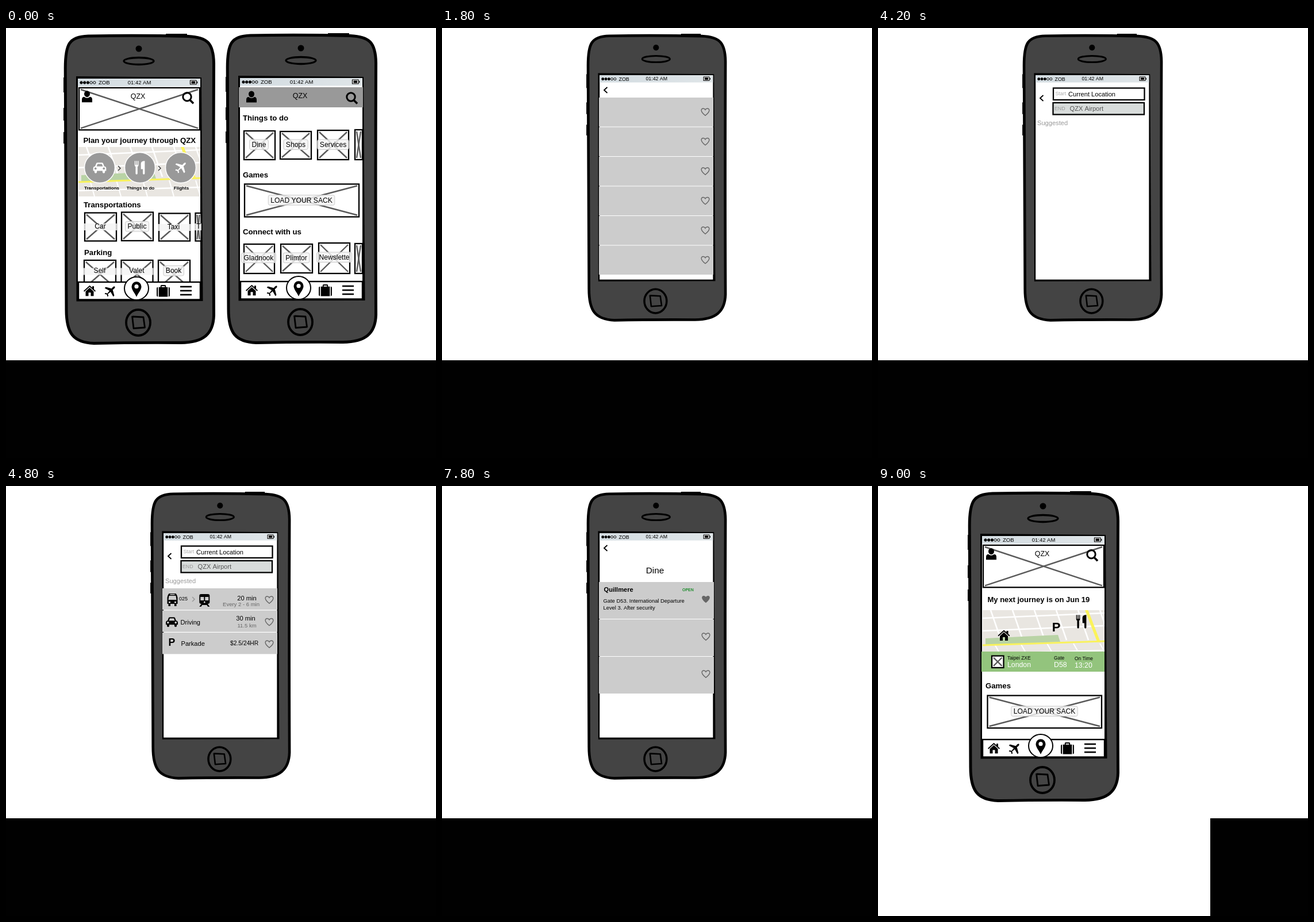
An HTML page with a canvas for the animation above (9600 ms loop, 748 px wide and 748 px high).

```html
<!DOCTYPE html>
<html lang="en">
<head>
<meta charset="utf-8">
<title>Airport app wireframe</title>
<style>
html, body { margin: 0; width: 100%; height: 100%; overflow: hidden; background: #fff; }
canvas { display: block; width: 748px; height: 748px; }
</style>
</head>
<body>
<canvas id="stage" width="748" height="748"></canvas>
<script>
const c = document.getElementById('stage').getContext('2d');
const STEP = 600, LINK = '#1c5088', GREY = '#999', DARK = '#666', ROW = '#ccc';
const PORT = 'QZX', GAME = 'LOAD YOUR SACK', DINER = 'Quillmere';

const ICON = {
  house: 'M-7 1L0-5.5 7 1V9H2V3H-2V9H-7ZM-10.5 0L0-9.5 4.5-5.5V-8H7.5V-2.7L10.5 0 9.3 1.4 0-7-9.3 1.4Z',
  plane: 'M9-9C7-10 5-8 3-5L-8-8-10-6-1-1-5 4-9 3-10 5-6 6-5 10-3 9-4 5 1 1 6 10 8 8 5-3C8-5 10-7 9-9Z',
  car: 'M-10.5 1Q-10-2-7.5-2L-5.5-7Q-5-8-3.5-8H3.5Q5-8 5.5-7L7.5-2Q10-2 10.5 1V5H8.5V7Q8.5 9 6.5 9T4.5 7V5H-4.5V7Q-4.5 9-6.5 9T-8.5 7V5H-10.5ZM-5-2H5L3.5-6H-3.5ZM-8.5 1.3a1.8 1.8 0 1 0 3.6 0a1.8 1.8 0 1 0-3.6 0M4.9 1.3a1.8 1.8 0 1 0 3.6 0a1.8 1.8 0 1 0-3.6 0',
  bus: 'M-6-11H6Q8-9 9-4V7H7V11H3.5V7H-3.5V11H-7V7H-9V-4Q-8-9-6-11ZM-6-7L-7 0H7L6-7ZM-6.5 3h3v2.5h-3zM3.5 3h3v2.5h-3zM-4-10h8v1.5h-8z',
  train: 'M-6-11H6Q9-11 9-8V3Q9 6 5.5 6L9 11H6L4 8H-4L-6 11H-9L-5.5 6Q-9 6-9 3V-8Q-9-11-6-11ZM-7-6V0H-1V-6ZM1-6V0H7V-6ZM-1.5 3a1.5 1.5 0 1 0 3 0a1.5 1.5 0 1 0-3 0',
  food: 'M-11-14H-9.4V-6H-7.8V-14H-6.2V-6H-4.6V-14H-3V-5Q-3-3-5-2V12Q-5 14-7 14T-9 12V-2Q-11-3-11-5ZM10-14V12Q10 14 8 14T6 12V3H2V-8Q2-14 10-14Z',
  shop: 'M-13-13H13L14-9.5H-14ZM-14-8.5H14L10.5 6.5H-10.5Z',
  case: 'M-12-7H-6V-9Q-6-12-3-12H3Q6-12 6-9V-7H12Q14-7 14-5V3H3V1H-3V3H-14V-5Q-14-7-12-7ZM-4-7H4V-9Q4-10 3-10H-3Q-4-10-4-9ZM-14 4.5H-3V6H3V4.5H14V10Q14 12 12 12H-12Q-14 12-14 10Z',
  bag: 'M-11-4Q-11-6-9-6V10Q-11 10-11 8ZM-7.5-6H-4.5V-8Q-4.5-9.5-3-9.5H3Q4.5-9.5 4.5-8V-6H7.5V10H-7.5ZM-2.7-6H2.7V-7.7H-2.7ZM9-6Q11-6 11-4V8Q11 10 9 10Z',
  pin: 'M0 13C-3 6-8.5 1-8.5-5A8.5 8.5 0 0 1 8.5-5C8.5 1 3 6 0 13ZM-3.6-5a3.6 3.6 0 1 0 7.2 0a3.6 3.6 0 1 0-7.2 0',
  user: 'M-5-5a5 5.5 0 1 0 10 0a5 5.5 0 1 0-10 0M-9 9.5V5Q-9 0-5 0Q0 4 5 0Q9 0 9 5V9.5Z',
  heart: 'M0 6.3C-9.5-1-7.5-6-3.7-6C-1.7-6-.5-5 0-3.8C.5-5 1.7-6 3.7-6C7.5-6 9.5-1 0 6.3Z'
};
for (const k in ICON) ICON[k] = new Path2D(ICON[k]);

function at(x, y, s, draw) {
  c.save(); c.translate(x, y); c.scale(s, s); draw(); c.restore();
}
function icon(name, x, y, s = 1, color = '#000') {
  at(x, y, s, () => { c.fillStyle = color; c.fill(ICON[name], 'evenodd'); });
}
function heart(x, y, full) {
  if (full) return icon('heart', x, y, 1, DARK);
  at(x, y, 1, () => { c.strokeStyle = DARK; c.lineWidth = 1.4; c.stroke(ICON.heart); });
}
function text(s, x, y, size, color = '#000', align = 'left', weight = 'normal') {
  c.font = `${weight} ${size}px "Liberation Sans", Arial, sans-serif`;
  c.fillStyle = color; c.textAlign = align; c.textBaseline = 'alphabetic';
  c.fillText(s, x, y + size * 0.32);
}
const mid = (s, x, y, size, color, weight) => text(s, x, y, size, color, 'center', weight);
const bold = (s, x, y, size = 13.2) => text(s, x, y, size, '#000', 'left', 'bold');
function rect(x0, y0, x1, y1, fill, stroke, w = 2) {
  if (fill) { c.fillStyle = fill; c.fillRect(x0, y0, x1 - x0, y1 - y0); }
  if (stroke) { c.strokeStyle = stroke; c.lineWidth = w; c.strokeRect(x0, y0, x1 - x0, y1 - y0); }
}
function line(color, w, ...p) {
  c.strokeStyle = color; c.lineWidth = w; c.beginPath();
  for (let i = 0; i < p.length; i += 2) c.lineTo(p[i], p[i + 1]);
  c.stroke();
}
function oval(x, y, rx, ry, fill, stroke, w = 2) {
  c.beginPath(); c.ellipse(x, y, rx, ry, 0, 0, 7);
  if (fill) { c.fillStyle = fill; c.fill(); }
  if (stroke) { c.strokeStyle = stroke; c.lineWidth = w; c.stroke(); }
}

// Device, drawn at its large size with the top left corner at 0,0.
function phone() {
  for (const [y, h] of [[76, 26], [129, 22], [171, 20]]) line('#000', 4, 1, y, 1, y + h);
  line('#000', 4, 177, 2, 214, 2);
  c.fillStyle = '#444'; c.strokeStyle = '#000'; c.lineWidth = 5; c.lineJoin = 'round';
  const body = new Path2D('M2.2 60C2.2 18 8.5 5 42 4Q130 2.5 216 4.5C249 6 260 16 260.5 52Q259.5 280 260.5 490C259.5 522 243 537 203 537.5Q120 537 52 538.5C15 537 4 520 4 480Q2.7 270 2.2 60Z');
  c.fill(body); c.stroke(body);
  oval(130, 26, 5.5, 5.5, '#000');
  oval(130, 47.5, 26, 6, null, '#000', 3.3);
  oval(129, 502.5, 21, 22.5, null, '#000', 3.8);
  line('#000', 2.8, 119, 492, 138, 493, 140.5, 511, 121, 512.5, 118.5, 491);
  c.fillStyle = '#000'; c.beginPath();
  for (const [x, y] of [[21, 74], [239, 76], [241.5, 465], [21.5, 465.5]]) c.lineTo(x, y);
  c.fill();
  rect(24, 78, 237, 462, '#fff');
  const g = c.createLinearGradient(24, 0, 237, 0);
  g.addColorStop(0, '#d3dce1'); g.addColorStop(1, '#dfe5e8');
  rect(24, 78, 237, 91.5, g);
  for (let i = 0; i < 5; i++) oval(30 + i * 5.7, 85, 2.2, 2.2, i < 3 ? '#000' : null, '#000', 1);
  text('ZOB', 60, 85, 9.6);
  mid('01:42 AM', 131, 85, 9.5);
  rect(219.5, 81, 230, 88, '#fff', '#000', 1.2);
  rect(221.5, 82.5, 228, 86.7, '#000');
  rect(231, 83, 232.3, 86.3, '#000');
}

function crossBox(x0, y0, x1, y1, label, round, lx = (x0 + x1) / 2, ly = (y0 + y1) / 2) {
  rect(x0, y0, x1, y1, '#fff', '#000', 2.3);
  line('#5a5a5a', 2.4, x0 + 3, y0 + 3, x1 - 3, y1 - 3);
  line('#5a5a5a', 2.4, x0 + 3, y1 - 3, x1 - 3, y0 + 3);
  if (!label) return;
  c.font = '12.1px "Liberation Sans", Arial, sans-serif';
  const w = c.measureText(label).width / 2 + 4;
  c.fillStyle = 'rgba(245,245,245,.82)';
  if (round) {
    c.beginPath(); c.roundRect(lx - w, ly - 9, 2 * w, 17.5, 3); c.fill();
    c.strokeStyle = '#ccc'; c.lineWidth = 1; c.stroke();
  } else c.fillRect(x0 - 2, ly - 5, x1 - x0 + 3, 12);
  mid(label, lx, ly, 12.1);
}

// Street map strip; the origin is its top left corner.
function map(x, y, h) {
  at(x, y, 1, () => {
    c.beginPath(); c.rect(0, 0, 212, h); c.clip();
    rect(0, 0, 212, h, '#e9e6e1');
    for (const [a, b] of [[14, 5], [36, 27], [76, 70]]) line('#fff', 2.6, 0, a, 212, b);
    for (let i = 0; i < 6; i++) line('#fff', 2.5, 14 + i * 38, 0, 32 + i * 38, 52);
    for (let i = 0; i < 5; i++) line('#fff', 2, 20 + i * 46, 58, 28 + i * 46, h);
    c.fillStyle = '#b9d3a5'; c.beginPath();
    for (const [a, b] of [[5, 49], [131, 43], [135, 55], [5, 61]]) c.lineTo(a, b);
    c.fill();
    line('#f9f25c', 3, 0, 61, 212, 54);
    line('#fbf35a', 5, 180, -2, 202, 55);
  });
}

function chevron(x, y, w, h, color, lw) { line(color, lw, x - w, y - h, x + w, y, x - w, y + h); }
function tools(ux, sx, y) {
  icon('user', ux, y);
  oval(sx, y, 7.2, 7.2, null, '#000', 3);
  line('#000', 3.6, sx + 5, y + 5.5, sx + 11, y + 11.5);
  mid(PORT, 229.5, 119.4, 12.4);
}
function nav() {
  rect(126, 442, 338, 472.5, '#fff', '#000', 2.4);
  oval(227, 453, 21, 20, '#fff', '#000', 2);
  icon('pin', 227, 454.7);
  icon('house', 145.5, 457.3);
  icon('plane', 181, 458, .93);
  icon('bag', 273.5, 457, 1.04);
  for (const y of [450, 457, 464]) line('#000', 2.6, 303, y, 323, y);
}
// Large device; the frame and inside are laid out for a screen at 125,88.
function large(dx, dy, inside) {
  at(dx, dy, 1, () => {
    at(101, 10, 1, phone);
    c.beginPath(); c.rect(123, 86, 217, 388); c.clip();
    inside(); nav();
  });
}
function banner() { crossBox(127, 104, 337, 177.3); tools(141, 315, 119.7); }

function home() {
  large(0, 0, () => {
    banner();
    bold(`Plan your journey through ${PORT}`, 134.5, 195.4);
    map(126, 207, 86);
    const stops = [['car', 'Transportations', 163, 1.08], ['food', 'Things to do', 233, .84], ['plane', 'Flights', 304, .95]];
    for (const [ic, label, x, s] of stops) {
      oval(x, 243, 26.5, 26.5, GREY, '#fff', 1.5);
      icon(ic, x, 243, s, '#fff');
      mid(label, x < 200 ? 166.5 : x + 1, 278.5, 8.1, '#000', 'bold');
    }
    chevron(197, 244, 2, 4, '#333', 1.4);
    chevron(267, 244, 2, 4, '#333', 1.4);
    bold('Transportations', 135, 307.5);
    crossBox(137, 321.5, 192, 370.5, 'Car', 0, 164, 345);
    crossBox(201, 320.5, 256, 370, 'Public', 1, 228, 345.5);
    crossBox(266, 322.5, 320, 370.5, 'Taxi', 0, 291.5, 346);
    crossBox(329.5, 322, 339.5, 370.5, 'T', 0, 335, 345);
    bold('Parking', 136, 391);
    ['Self', 'Valet', 'Book'].forEach((s, i) =>
      crossBox(136 + i * 64.5, 404, 191 + i * 64.5, 453, s, i == 2, 163 + i * 64.3, 422.5));
  });
  large(282, -1, () => at(-282, 1, 1, () => {
    rect(405, 103, 621, 138, GREY);
    at(282, -1, 1, () => tools(145, 318, 121));
    bold('Things to do', 412, 157);
    crossBox(414, 179, 468, 229, 'Dine', 1, 440, 203);
    crossBox(477, 180, 531, 228, 'Shops', 1, 504, 203);
    crossBox(542, 178, 596, 229, 'Services', 1, 569, 203);
    crossBox(607, 177, 620, 229);
    bold('Games', 412, 255.7);
    crossBox(415, 271.5, 614, 328.5, GAME, 1, 514, 299.7);
    bold('Connect with us', 412, 355);
    crossBox(414, 376, 467, 427, 'Gladnook', 1, 439.5, 400);
    crossBox(478, 376, 533, 426, 'Plimtor', 1, 505, 400);
    crossBox(544, 374, 598, 427, 'Newslette', 1, 571, 399);
    crossBox(607, 375, 620, 427);
  }));
}

function done() {
  large(56, -1, () => at(-56, 1, 1, () => {
    at(56, -1, 1, banner);
    bold('My next journey is on Jun 19', 190.5, 198, 13);
    map(182, 216, 72);
    icon('house', 219, 260);
    mid('P', 310, 245.5, 22, '#000', 'bold');
    icon('food', 354, 236, .84);
    rect(180, 288, 394, 323, '#93c47d');
    crossBox(198, 295.5, 218.5, 316);
    const facts = [['Taipei ZXE', 'London', 225, 299], ['Gate', 'D58', 306, 299], ['On Time', '13:20', 342, 300]];
    for (const [a, b, x, y] of facts) { text(a, x, y, 8.4); text(b, x, y + 12, 12.3, '#fff'); }
    bold('Games', 187, 348);
    crossBox(190.5, 364.5, 389, 421, GAME, 1, 289.5, 392);
  }));
}

function button(x0, y0, x1, y1, label) {
  rect(x0 + 3, y0 + 3, x1 + 2.5, y1 + 2.5, '#000');
  rect(x0, y0, x1, y1, '#94bbf2', '#000', 1.7);
  mid(label, 372, (y0 + y1) / 2 + .6, 11.2);
}
function close() {
  line(GREY, 3, 454.3, 100.5, 462, 108);
  line(GREY, 3, 454.3, 108, 462, 100.5);
}
function step(n, title, x = 370) {
  for (let i = 0; i < 3; i++) oval(356.5 + i * 12.5, 105.3, 3.4, 3.4, i < n ? DARK : null, DARK, 1.6);
  close();
  mid(title, x, 147.7, 15.3);
}
const skip = () => mid('Skip this step', 367.5, 419, 11.1, '#555');
const back = y => line('#000', 1.8, 287.5, y - 5, 282, y, 287.5, y + 5);

function intro() {
  close();
  bold('Let us help you plan the', 282, 303.5, 12);
  bold('journey through ' + PORT + '.', 282, 317.5, 12);
  ['Sample description. Sample', 'description. Sample description.'].forEach((s, i) => {
    text(s, 283, 339 + i * 12.4, 10.3);
    text(s, 283, 363.8 + i * 12.4, 10.3);
  });
  button(284, 400, 461, 425.5, 'Get Started');
}
function flightSearch() { step(1, 'Flights', 366); skip(); }
function flightList(full) {
  back(108);
  for (let i = 0; i < 6; i++) {
    const y = 121 + i * 51.5;
    rect(273, y, 472, y + 50.5, ROW);
    heart(458, y + 25, full && !i);
  }
}
function flightPicked() {
  step(1, 'Flights', 366);
  rect(274, 168, 470, 219, ROW);
  heart(458, 193, true);
  mid('Edit Flights', 370, 243, 11.1, LINK);
  mid('Add a Connecting Flight', 371.5, 268.5, 11.1, LINK);
  button(291, 399, 455, 424, 'Next');
}
function rideStart() { step(2, 'Transportations'); skip(); }
function routeForm() {
  back(122);
  rect(305, 104.5, 463.5, 125, '#fff', '#000', 2.3);
  text('Start', 308.5, 114, 8.8, '#aaa');
  text('Current Location', 331, 115, 11.1);
  rect(304.5, 130, 463, 150.5, '#d8dcdb', '#000', 2.3);
  text('END', 307, 140, 8.8, GREY);
  text(PORT + ' Airport', 333.5, 140, 11.1, '#555');
  text('Suggested', 277, 165.5, 11.1, GREY);
}
function parkade(y) {
  text('P', 282.5, y - 1.5, 17.5, '#000', 'left', 'bold');
  text('Parkade', 304.5, y, 11.1);
  text('$2.5/24HR', 390, y, 10.3);
}
function routes(full) {
  routeForm();
  for (let i = 0; i < 3; i++) {
    rect(272, 178 + i * 38.5, 472, 215.3 + i * 38.5, ROW);
    heart(458, 198 + i * 38.5, full && i == 2);
  }
  icon('bus', 289.5, 198);
  text('025', 301, 196, 9);
  chevron(326, 197, 2, 4, GREY, 1.5);
  icon('train', 345.3, 199);
  mid('20 min', 419, 195, 11.2);
  mid('Every 2 - 6 min', 409, 206, 9.5, DARK);
  icon('car', 288.5, 236.3);
  text('Driving', 303.5, 237, 11.1);
  mid('30 min', 417, 230, 11.2);
  mid('11.5 km', 419, 243, 9.5, DARK);
  parkade(274);
}
function ridePicked() {
  step(2, 'Transportations');
  rect(273, 168, 472, 219, ROW);
  parkade(193);
  heart(458, 193, true);
  mid('Edit Transportations', 370, 243, 11.1, LINK);
  button(291, 398, 455, 422, 'Next');
}
function topics() {
  step(3, 'Things To Do', 370.5);
  for (const [x, y] of [[332.5, 210], [416.5, 210], [331.5, 291], [415.5, 291]]) oval(x, y, 38.3, 36.5, GREY);
  icon('food', 331.5, 204, 1, '#fff');
  icon('shop', 416.7, 202, 1, '#fff');
  const strap = new Path2D('M411 205V211Q411 216 416.5 216T422 211V205');
  c.strokeStyle = GREY; c.lineWidth = 4; c.stroke(strap);
  c.strokeStyle = '#fff'; c.lineWidth = 1.8; c.stroke(strap);
  icon('case', 332, 283, 1, '#fff');
  oval(415, 277, 13, 13, '#fff');
  mid('Dine', 332, 227, 7.8, '#fff', 'bold');
  mid('Shop', 416, 224, 7.8, '#fff', 'bold');
  mid('Services', 329.7, 306.5, 7.8, '#fff', 'bold');
  mid('Art &', 416, 297.5, 9.4, '#fff');
  mid('Architecture', 416, 309.5, 9.4, '#fff');
  skip();
}
function diner(full) {
  rect(273, 167, 473, 231, ROW);
  bold(DINER, 281.5, 180.5, 11.1);
  text('OPEN', 418, 181, 7, '#1d8c2c', 'left', 'bold');
  text('Gate D53. International Departure', 280.5, 200, 9.4);
  text('Level 3. After security', 280.5, 212, 9.4);
  heart(459, 197, full);
}
function dinerList(full) {
  back(108);
  mid('Dine', 370.5, 147.5, 15.3);
  diner(full);
  for (const y of [232, 297]) { rect(273, y, 473, y + 64, ROW); heart(459, y + 30, false); }
}
function dinerPicked() {
  step(3, 'Things To Do', 370.5);
  diner(true);
  mid('Edit Things To Do', 368, 256, 11.1, LINK);
  button(286, 398, 459, 423, 'Create Journey');
}

const small = inside => () => { at(252, 10, .9255, phone); inside(); };
const scenes = [
  home,
  ...[intro, flightSearch, () => flightList(false), () => flightList(true), flightPicked,
    rideStart, routeForm, () => routes(false), () => routes(true), ridePicked,
    topics, () => dinerList(false), () => dinerList(true), dinerPicked].map(small),
  done
];

let shown = -1;
function tick() {
  const i = Math.floor(performance.now() / STEP) % scenes.length;
  if (i !== shown) {
    shown = i;
    rect(0, 0, 748, 748, '#fff');
    rect(scenes[i] === done ? 578 : 0, 578, 748, 748, '#010101');
    scenes[i]();
  }
  requestAnimationFrame(tick);
}
tick();
</script>
</body>
</html>
```
